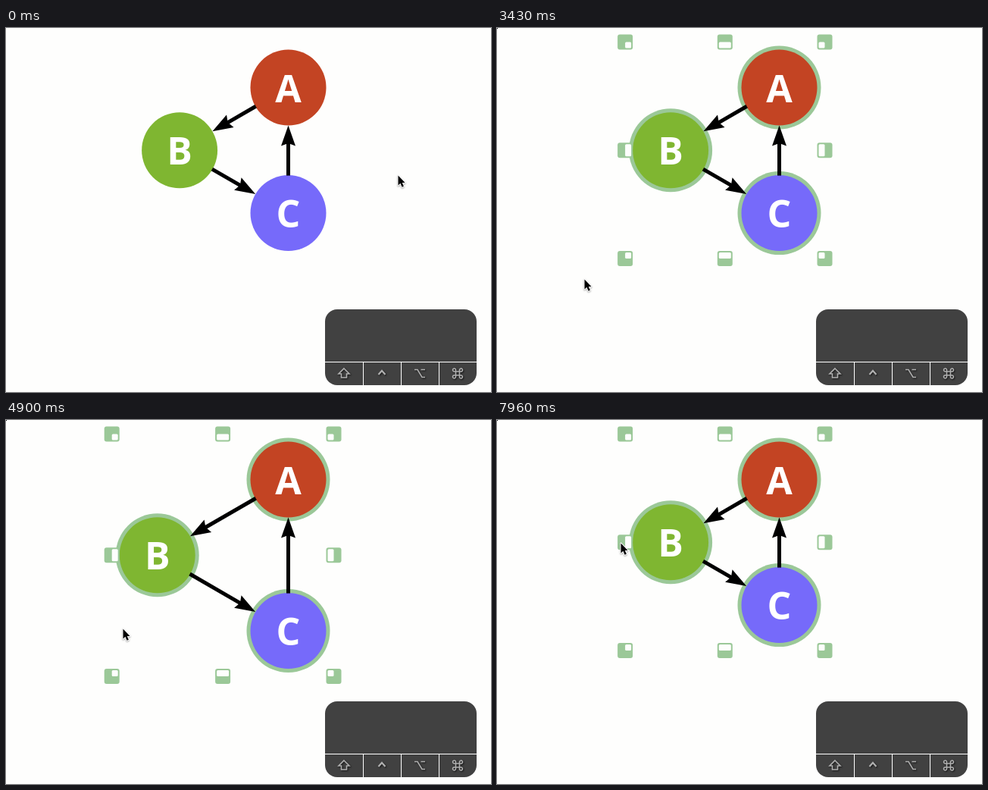
An HTML page with a canvas for the animation above (8000 ms loop, 640 by 480 pixels).

```html
<!DOCTYPE html>
<html lang="en">
<head>
<meta charset="utf-8">
<title>Resizing a selected graph</title>
<style>
  html, body { margin: 0; width: 100%; height: 100%; overflow: hidden; background: #fefefd; }
  canvas { display: block; }
</style>
</head>
<body>
<canvas id="stage" width="640" height="480"></canvas>
<script>
const ctx = document.getElementById('stage').getContext('2d');
const LOOP = 8000, SELECT_AT = 430, RADIUS = 50, GREEN = '#9bc898';

// Keyframes: time in ms, then the values at that time
const POINTER = [
  [0, 517, 194], [500, 517, 194], [1760, 306, 281], [2500, 173, 304], [3100, 171, 304],
  [3430, 115, 331], [4160, 30, 385], [4300, 32, 384], [4900, 154, 275],
  [5300, 190, 255], [5900, 194, 252], [6900, 432, 157], [7100, 430, 158],
  [7760, 163, 162], [LOOP, 163, 162]
];
const SCALE = [[0, 1], [3430, 1], [4100, 1.955], [4220, 1.955], [4900, 1.205], [5300, 1], [LOOP, 1]];

function sample(keys, time) {
  const next = Math.max(1, keys.findIndex(key => key[0] > time));
  const from = keys[next - 1], to = keys[next];
  const u = (time - from[0]) / (to[0] - from[0]);
  const ease = u * u * (3 - 2 * u);
  return from.slice(1).map((value, i) => value + (to[i + 1] - value) * ease);
}

function roundRect(x, y, w, h, r, color) {
  ctx.fillStyle = color;
  ctx.beginPath();
  ctx.roundRect(x, y, w, h, r);
  ctx.fill();
}

function disc(x, y, r, color) {
  ctx.fillStyle = color;
  ctx.beginPath();
  ctx.arc(x, y, r, 0, 2 * Math.PI);
  ctx.fill();
}

function drawNode({ x, y, label, color }, selected) {
  if (selected) disc(x, y, RADIUS + 5, GREEN);
  disc(x, y, RADIUS, color);
  ctx.fillStyle = '#fff';
  ctx.font = '700 50px "Open Sans", "Noto Sans", sans-serif';
  ctx.textAlign = 'center';
  ctx.fillText(label, x, y + 19);
}

const arrowHead = new Path2D('M0 0L-27 -9.5L-23.5 0L-27 9.5Z');

function drawEdge(from, to) {
  const dx = to.x - from.x, dy = to.y - from.y;
  const length = Math.hypot(dx, dy) - RADIUS;
  ctx.save();
  ctx.translate(from.x, from.y);
  ctx.rotate(Math.atan2(dy, dx));
  ctx.fillStyle = '#000';
  ctx.fillRect(RADIUS - 0.5, -2.5, length - RADIUS - 21, 5);
  ctx.translate(length, 0);
  ctx.fill(arrowHead);
  ctx.restore();
}

// The pale part of each handle faces the middle of the selection
function drawHandles(left, top, right, bottom) {
  const span = side => side < 0 ? [0, 8] : side > 0 ? [-8, 8] : [-8, 16];
  for (const sx of [-1, 0, 1]) for (const sy of [-1, 0, 1]) {
    if (!sx && !sy) continue;
    const x = (left + right) / 2 + sx * (right - left) / 2;
    const y = (top + bottom) / 2 + sy * (bottom - top) / 2;
    const [ix, iw] = span(sx), [iy, ih] = span(sy);
    roundRect(x - 10, y - 10, 20, 20, 3, GREEN);
    roundRect(x + ix, y + iy, iw, ih, 1.5, '#fefefd');
  }
}

const keyIcons = [
  'M0 -6.5L7 0.5H3.5V5.5H-3.5V0.5H-7Z',
  'M-4.5 1.5L0 -3.5L4.5 1.5',
  'M-7 -5H-3L3 5H7M1.5 -5H7',
  'M-2.5 -2.5H2.5V2.5H-2.5ZM-2.5 -2.5V-4A2 2 0 1 0 -4.5 -2.5H-2.5' +
  'M2.5 -2.5H4A2 2 0 1 0 2.5 -4.5V-2.5M2.5 2.5V4A2 2 0 1 0 4.5 2.5H2.5' +
  'M-2.5 2.5H-4A2 2 0 1 0 -2.5 4.5V2.5'
].map(path => new Path2D(path));

function drawKeyPanel() {
  roundRect(421, 371, 200, 100, 16, 'rgba(0, 0, 0, 0.74)');
  ctx.fillStyle = '#fff';
  ctx.fillRect(421, 440, 200, 1);
  for (const x of [471, 521, 571]) ctx.fillRect(x, 441, 1, 30);
  keyIcons.forEach((icon, i) => {
    ctx.save();
    ctx.translate(446 + 50 * i, 455.5);
    ctx.strokeStyle = '#b0b0b0';
    ctx.lineWidth = i === 1 ? 2.2 : 1.6;
    ctx.shadowColor = '#111';
    ctx.shadowBlur = 2;
    ctx.shadowOffsetX = ctx.shadowOffsetY = 1;
    ctx.stroke(icon);
    ctx.restore();
  });
}

const arrowPointer = new Path2D('M0.5 0.5V13.5L3.4 10.8L5.6 15.8L7.9 14.8L5.8 9.9H9.6Z');

function drawPointer(x, y) {
  ctx.save();
  ctx.translate(x, y);
  ctx.lineJoin = 'round';
  ctx.strokeStyle = '#fff';
  ctx.lineWidth = 2;
  ctx.shadowColor = 'rgba(0, 0, 0, 0.35)';
  ctx.shadowBlur = 2;
  ctx.shadowOffsetY = 1;
  ctx.stroke(arrowPointer);
  ctx.shadowColor = 'transparent';
  ctx.fillStyle = '#000';
  ctx.fill(arrowPointer);
  ctx.restore();
}

function draw(now) {
  const time = now % LOOP;
  const selected = time >= SELECT_AT;
  const [scale] = sample(SCALE, time);
  const a = { x: 372.5, y: 78.5, label: 'A', color: '#c34423' };
  const b = { x: a.x - 143.4 * scale, y: a.y + 82.8 * scale, label: 'B', color: '#7fb631' };
  const c = { x: a.x, y: a.y + 165.6 * scale, label: 'C', color: '#766afa' };

  ctx.fillStyle = '#fefefd';
  ctx.fillRect(0, 0, 640, 480);
  for (const node of [a, b, c]) drawNode(node, selected);
  drawEdge(a, b);
  drawEdge(b, c);
  drawEdge(c, a);
  if (selected) {
    drawHandles(b.x - 60, a.y - 60, a.x + 60, c.y + 60);
    ctx.fillStyle = '#000';
    ctx.fillRect(0, 0, 1, 1);
  }
  drawKeyPanel();
  drawPointer(...sample(POINTER, time));
}

const start = performance.now();
function tick() {
  draw(performance.now() - start);
  requestAnimationFrame(tick);
}
tick();
</script>
</body>
</html>
```
